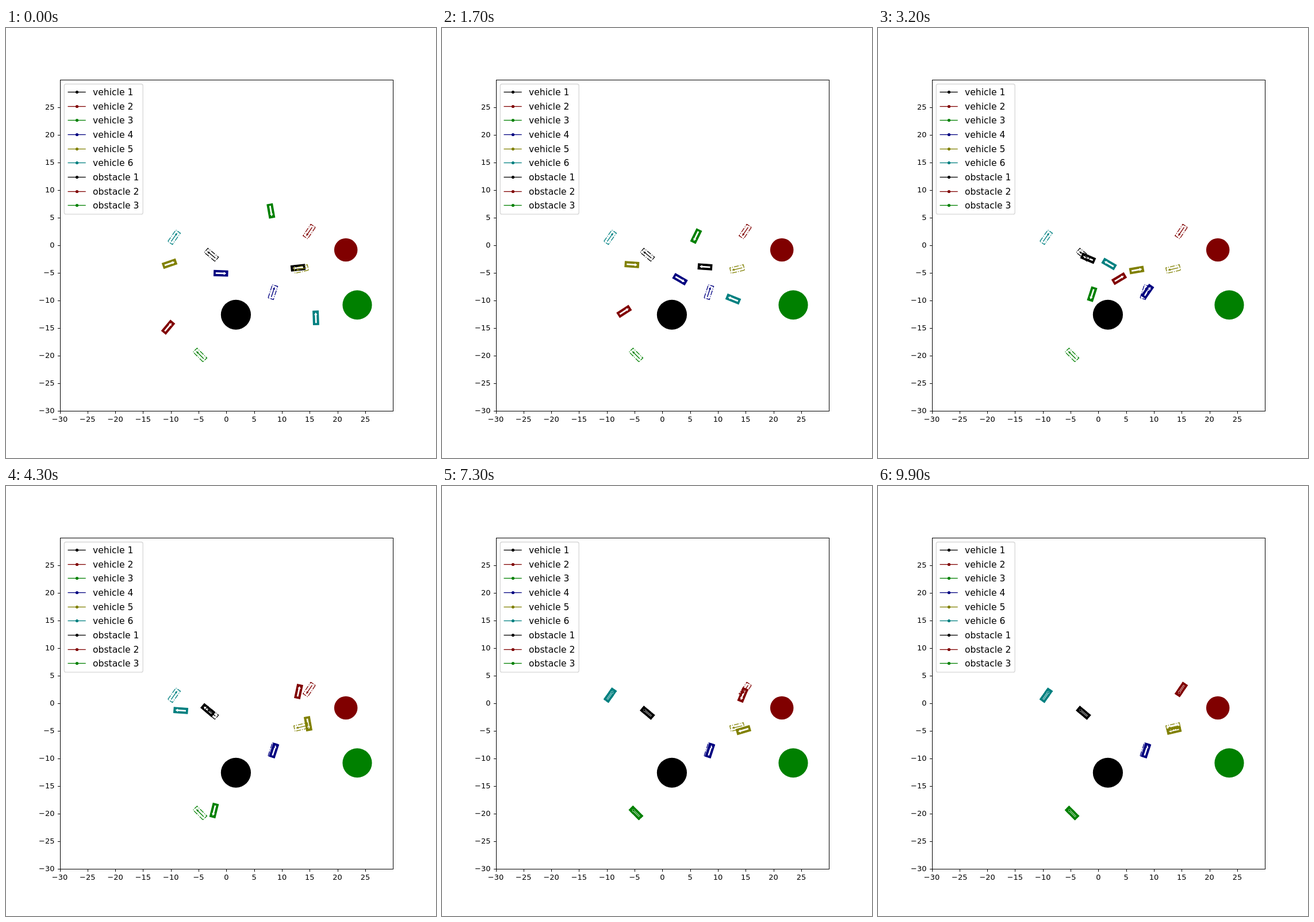
An HTML page with a canvas for the animation above (10000 ms loop, 748 px wide and 748 px high).

```html
<!DOCTYPE html>
<html>
<head>
<meta charset="utf-8">
<style>
html, body { margin: 0; height: 100%; overflow: hidden; background: #fff; }
canvas { display: block; }
</style>
</head>
<body>
<canvas id="stage" width="748" height="748"></canvas>
<script>
const ctx = document.getElementById('stage').getContext('2d');
const BLACK = '#000', RED = '#800000', GREEN = '#008000';
const BLUE = '#000080', OLIVE = '#808000', TEAL = '#008080';
const PT = 748 / 8 / 72;
const LENGTH = 24.1, WIDTH = 9.6;
const snap = v => Math.round(v) + 0.5;
const plotX = v => 748 * (0.125 + 0.775 * (v + 30) / 60);
const plotY = v => 748 * (0.89 - 0.77 * (v + 30) / 60);
const unit = deg => [Math.cos(deg * Math.PI / 180), Math.sin(deg * Math.PI / 180)];

// Times, in tenths of a second, at which every car passes its waypoints
const TIMES = [1, 17, 32, 43, 50, 59, 74, 88];
const cars = [];

// Waypoints are x, y, heading; the last is the goal, missed sideways by some pixels
function car(color, miss, ...path) {
  const goal = path.pop(), [c, s] = unit(goal[2]);
  path.push([goal[0] - s * miss, goal[1] + c * miss, goal[2]]);
  cars.push({ color, goal, path });
}

car(BLACK, 0, [508, 417, 174], [457.5, 415.5, 184], [365.5, 400.5, 203],
  [351.2, 389.8, 220], [357.3, 394.5, 220]);
car(RED, 0, [282, 520.5, -50], [316.8, 493, -33], [419.5, 436, -31], [509, 357.5, -78],
  [535, 355, -160], [525.5, 368.2, -195], [523.5, 363, -248], [527.5, 354, -236]);
car(GREEN, 0, [460.8, 318.2, 80], [442, 362, 116], [372.5, 463, 108], [362, 564.5, 104],
  [333, 578.5, 190], [322.5, 560.5, 228], [337.5, 568.8, 225]);
car(BLUE, 2, [373.8, 426.7, 2], [414, 437, 30], [468.7, 458.3, -55], [464.3, 459.5, -72]);
car(OLIVE, -5.8, [284.5, 410, -19], [330.3, 411.5, 4], [450, 421, -10], [525.5, 413.5, 80],
  [514.5, 435, 145], [508, 435.5, 162], [524.5, 424.5, 164], [513.5, 419.2, 167]);
car(TEAL, 0, [539, 504.2, -92], [506.5, 471.5, -158], [402, 410.5, -150], [304, 390.5, -176],
  [284, 372, -100], [298, 350.8, -52], [292.5, 364, -55]);

const obstacles = [
  [BLACK, 399.9, 498.7, 26.1],
  [RED, 591.2, 386, 20.3],
  [GREEN, 611, 481.7, 25.6]
];

// Zero where the two rates change sign, so a car stops before it reverses
const blend = (a, b) => a * b > 0 ? 2 * a * b / (a + b) : 0;

// Cars roll along their heading, forwards or backwards: returns rates of x, y, heading
function velocity(path, i) {
  if (i < 1 || i > path.length - 2) return [0, 0, 0];
  const [c, s] = unit(path[i][2]);
  const rates = j => {
    const [dx, dy, turn] = path[j + 1].map((v, k) => (v - path[j][k]) / (TIMES[j + 1] - TIMES[j]));
    return [Math.sign(dx * c + dy * s) * Math.hypot(dx, dy), turn];
  };
  const before = rates(i - 1), after = rates(i);
  const speed = blend(before[0], after[0]);
  return [speed * c, speed * s, blend(before[1], after[1])];
}

function pose(path, t) {
  const last = path.length - 1;
  if (t >= TIMES[last]) return path[last];
  const i = TIMES.findIndex(v => v > t) - 1;
  const d = TIMES[i + 1] - TIMES[i], u = (t - TIMES[i]) / d;
  const ease = u * u * (3 - 2 * u);
  const start = velocity(path, i), end = velocity(path, i + 1);
  return path[i].map((p, k) => p + (path[i + 1][k] - p) * ease +
    d * u * (1 - u) * ((1 - u) * start[k] - u * end[k]));
}

function line(x1, y1, x2, y2) {
  ctx.beginPath();
  ctx.moveTo(x1, y1);
  ctx.lineTo(x2, y2);
  ctx.stroke();
}

function disc(color, x, y, r) {
  ctx.fillStyle = color;
  ctx.beginPath();
  ctx.ellipse(x, y, r, r * 0.9935, 0, 0, 7);
  ctx.fill();
}

function arrow(color, half) {
  const head = half + 1.4;
  ctx.fillStyle = color;
  ctx.beginPath();
  [[-9, -half], [5, -half], [5, -head], [9.5, 0], [5, head], [5, half], [-9, half]]
    .forEach(p => ctx.lineTo(...p));
  ctx.fill();
}

function vehicle(color, [x, y, heading], solid) {
  ctx.save();
  ctx.translate(x, y);
  ctx.rotate(heading * Math.PI / 180);
  ctx.strokeStyle = ctx.fillStyle = color;
  ctx.lineWidth = PT;
  if (!solid) ctx.setLineDash([6.4, 1.6, 1, 1.6].map(v => v * PT));
  ctx.beginPath();
  ctx.rect(-LENGTH / 2, -WIDTH / 2, LENGTH, WIDTH);
  if (solid) ctx.fill();
  ctx.stroke();
  if (solid) arrow('#fff', 1.4);
  else arrow(color, 0.7);
  ctx.restore();
}

function axes() {
  const left = snap(plotX(-30)), right = snap(plotX(30));
  const top = snap(plotY(30)), bottom = snap(plotY(-30));
  ctx.strokeStyle = ctx.fillStyle = '#000';
  ctx.lineWidth = 1;
  ctx.strokeRect(left, top, right - left, bottom - top);
  ctx.font = 10 * PT + 'px "DejaVu Sans", sans-serif';
  for (let v = -30; v < 30; v += 5) {
    const label = String(v).replace('-', '\u2212');
    const x = snap(plotX(v)), y = snap(plotY(v));
    line(x, bottom, x, bottom + 4.5);
    line(left, y, left - 4.5, y);
    ctx.textAlign = 'center';
    ctx.fillText(label, plotX(v), 685);
    ctx.textAlign = 'right';
    ctx.fillText(label, 84.4, Math.round(plotY(v) + 4.5));
  }
}

function legend() {
  ctx.beginPath();
  ctx.roundRect(101.3, 97.5, 136.9, 226.4, 3);
  ctx.fillStyle = 'rgba(255,255,255,.8)';
  ctx.fill();
  ctx.strokeStyle = 'rgba(204,204,204,.8)';
  ctx.lineWidth = PT;
  ctx.stroke();
  ctx.font = 12 * PT + 'px "DejaVu Sans", sans-serif';
  ctx.textAlign = 'left';
  const colors = [...cars.map(c => c.color), ...obstacles.map(o => o[0])];
  colors.forEach((color, i) => {
    const y = snap(111 + i * 24.65);
    ctx.strokeStyle = color;
    line(107.5, y, 138.7, y);
    disc(color, 123.5, y, 2.6);
    ctx.fillStyle = '#000';
    ctx.fillText(i < 6 ? 'vehicle ' + (i + 1) : 'obstacle ' + (i - 5), 151, y + 5.5);
  });
}

function draw() {
  const step = Math.max(1, Math.floor(performance.now() % 10000 / 100));
  ctx.fillStyle = '#fff';
  ctx.fillRect(0, 0, 748, 748);
  obstacles.forEach(o => disc(...o));
  cars.forEach(c => vehicle(c.color, pose(c.path, step), true));
  cars.forEach(c => vehicle(c.color, c.goal, false));
  axes();
  legend();
  requestAnimationFrame(draw);
}
draw();
</script>
</body>
</html>
```
